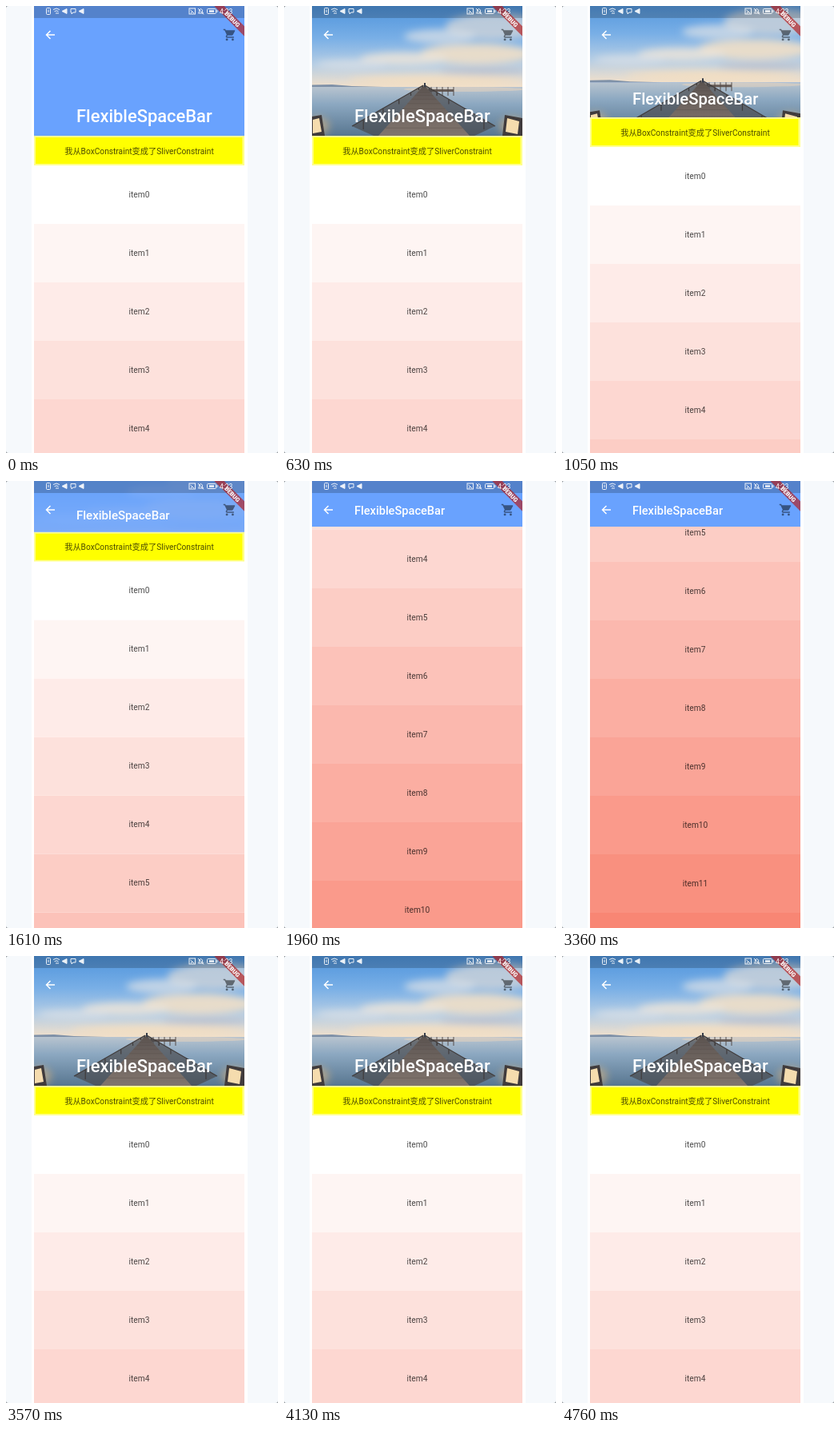
Animation of 340x558 px, one loop 4.83 s. Source, as an HTML page:

```html
<!DOCTYPE html>
<html lang="zh-CN">
<head>
<meta charset="utf-8">
<title>Collapsing app bar</title>
<style>
  html, body { margin: 0; width: 100%; height: 100%; overflow: hidden; background: #8d9196; }
  svg { display: block; width: 100vw; height: 100vh; }
  text { font-family: Roboto, "Noto Sans CJK SC", "Noto Sans CJK", sans-serif; }
  .label { font-size: 10.2px; fill: #000; fill-opacity: .7; text-anchor: middle; }
</style>
</head>
<body>
<svg viewBox="0 0 340 558" preserveAspectRatio="none">
  <defs>
    <clipPath id="screen"><rect x="35" width="263" height="558"/></clipPath>
    <clipPath id="barClip"><rect id="barClipBox" x="35" width="263" height="162"/></clipPath>
    <clipPath id="skyClip"><rect x="35" width="263" height="101"/></clipPath>
    <linearGradient id="sky" x2="0" y2="1">
      <stop offset="0" stop-color="#4f94dc"/>
      <stop offset=".4" stop-color="#79afe6"/>
      <stop offset=".72" stop-color="#b5cde4"/>
      <stop offset="1" stop-color="#f1e0cb"/>
    </linearGradient>
    <linearGradient id="sea" x2="0" y2="1">
      <stop offset="0" stop-color="#b8c4cf"/>
      <stop offset=".35" stop-color="#8ca8c1"/>
      <stop offset="1" stop-color="#587690"/>
    </linearGradient>
    <linearGradient id="deck" x2="0" y2="1">
      <stop offset="0" stop-color="#5d5552"/>
      <stop offset="1" stop-color="#81756e"/>
    </linearGradient>
    <filter id="soft" x="-50%" y="-50%" width="200%" height="200%"><feGaussianBlur stdDeviation="5"/></filter>
  </defs>

  <rect width="340" height="558" rx="3" fill="#f6f9fc"/>
  <rect x="32" width="270" height="558" fill="#fff"/>

  <g clip-path="url(#screen)">
    <g id="list">
      <rect x="35" y="162" width="263" height="37" fill="#ffff8c"/>
      <rect x="37" y="164" width="258.5" height="33" fill="#ff0"/>
      <text class="label" x="166.5" y="184.6">我从BoxConstraint变成了SliverConstraint</text>
    </g>

    <g clip-path="url(#barClip)">
      <rect x="35" width="263" height="162" fill="#69a2fe"/>
      <g id="photo">
        <rect x="35" width="263" height="101" fill="url(#sky)"/>
        <g clip-path="url(#skyClip)">
          <g filter="url(#soft)">
            <ellipse cx="262" cy="26" rx="60" ry="17" fill="#cbd2da" opacity=".85"/>
            <ellipse cx="195" cy="38" rx="45" ry="9" fill="#d9dfe6" opacity=".75"/>
            <ellipse cx="240" cy="60" rx="70" ry="13" fill="#f0dfc8" opacity=".9"/>
            <ellipse cx="150" cy="66" rx="55" ry="8" fill="#ebe4da" opacity=".85"/>
            <ellipse cx="85" cy="73" rx="45" ry="6" fill="#d9dfe7" opacity=".8"/>
            <ellipse cx="250" cy="81" rx="55" ry="5" fill="#b4bdcc" opacity=".75"/>
            <ellipse cx="190" cy="93" rx="110" ry="6" fill="#f6dfc0" opacity=".9"/>
          </g>
        </g>
        <rect x="35" y="101" width="263" height="61" fill="url(#sea)"/>
        <path d="M35 101V98.5L60 98 85 100 125 101Z" fill="#7f91a8"/>
        <ellipse cx="225" cy="104" rx="75" ry="3" fill="#ecd6bd" opacity=".5"/>
        <path d="M180 104H212V107H182Z" fill="#665b56"/>
        <path id="posts" fill="none" stroke="#554d4a" stroke-width="1"/>
        <path d="M174 99 85 150 112 162H238L264 150 176 99Z" fill="#474648" opacity=".65"/>
        <path d="M173 101H177L232 162H118Z" fill="url(#deck)"/>
        <path id="planks" fill="none" stroke="#544c49" stroke-width=".7" opacity=".55"/>
        <path id="rails" fill="none" stroke="#403c3c" stroke-width="1.2"/>
        <rect x="175" y="96" width="2" height="5" fill="#353b47"/>
        <g filter="url(#soft)" fill="#eebc78" opacity=".45">
          <ellipse cx="42" cy="150" rx="15" ry="12"/><ellipse cx="286" cy="150" rx="17" ry="12"/>
        </g>
        <path d="M35 138 47 136 51 162H35ZM298 140 276 136 273 162H298Z" fill="#403b3c"/>
        <path d="M36 142 44 140 47 157 36 159ZM294 144 279 140 277 157 292 160Z" fill="#f5dcae"/>
      </g>
    </g>

    <rect x="35" width="263" height="15" fill="#000" opacity=".2"/>
    <text id="title" font-size="14.6" font-weight="500" fill="#fff">FlexibleSpaceBar</text>
    <path d="M61 36H50.5M55.5 31 50.5 36 55.5 41" fill="none" stroke="#fff" stroke-width="1.5"/>
    <g transform="translate(271 27.3) scale(.73)" fill="#000" opacity=".48">
      <circle cx="7" cy="20" r="2"/><circle cx="17" cy="20" r="2"/>
      <path d="M1 2H4.3L5.2 4H20Q21.3 4 20.8 5.5L17.3 12Q16.7 13 15.5 13H8.1L7.2 14.8 7.4 15H19V17H7Q4.2 16.5 5.2 14L6.6 11.6 3 4H1Z"/>
    </g>

    <g transform="translate(298 0) rotate(45)">
      <rect x="-32" y="17.9" width="64" height="8.8" fill="#b71c1c" opacity=".66"/>
      <text x="1" y="25" font-size="7.4" font-weight="900" fill="#fff" text-anchor="middle">DEBUG</text>
    </g>

    <g fill="none" stroke="#fff" stroke-width="1" opacity=".9">
      <rect x="50.5" y="2.5" width="5" height="8" rx="1"/><path d="M53 4.5V8"/>
      <path d="M59 4.5Q63 1.5 67 4.5M60.5 6.8Q63 4.8 65.5 6.8M62 9H66"/>
      <path d="M70 6.5 76 3.5V9.5ZM91 6.5 97 3.5V9.5Z" fill="#fff"/>
      <path d="M81 3.5H87V8H84L82 10V8H81Z"/>
      <rect x="229" y="3" width="7.5" height="7"/><path d="M230.5 5 235 9M231 9 233 7"/>
      <path d="M240.5 9H246.5L245.5 7.5V5.5Q243.5 1.5 241.5 5.5V7.5ZM240 3 247 10.5"/>
      <rect x="251.5" y="3.5" width="11" height="6" rx="1"/><path d="M254 6.5H260" stroke-width="2.5"/><path d="M264 5V8"/>
    </g>
    <text x="267" y="10" font-size="8.5" fill="#fff">4:23</text>

    <ellipse id="glow" cx="166.5" rx="394" fill="#6aa3ff"/>
  </g>
</svg>

<script>
const LOOP = 4830, STEP = 70, ITEM = 73, ITEMS = 15;
const EXPANDED = 162, TOOLBAR = 57, RANGE = EXPANDED - TOOLBAR;
const PHOTO_READY = 140;

// [time in ms, value]
const SCROLL = [
  [0, 0], [770, 0], [910, 8], [1050, 23], [1330, 55], [1540, 85], [1610, 98.3],
  [1680, 118], [1750, 155], [1890, 330], [2030, 530], [2170, 685], [2240, 727],
  [3080, 727], [3150, 716], [3220, 690], [3290, 630], [3360, 536],
  [3430, 370], [3500, 165], [3570, 0], [LOOP, 0]
];
const GLOW = [[2170, 0], [2240, .35], [2310, .64], [2450, .75], [2520, .7], [2800, 0]];

const el = id => document.getElementById(id);
const clamp = v => Math.min(1, Math.max(0, v));

function add(parent, tag, attrs, text = "") {
  const node = document.createElementNS(parent.namespaceURI, tag);
  for (const key in attrs) node.setAttribute(key, attrs[key]);
  node.textContent = text;
  parent.append(node);
}

function sample(track, t) {
  const i = track.findIndex(p => p[0] > t);
  if (i < 0) return track.at(-1)[1];
  if (i === 0) return track[0][1];
  const [t0, a] = track[i - 1], [t1, b] = track[i];
  return a + (b - a) * (t - t0) / (t1 - t0);
}

function buildList() {
  for (let i = 0; i < ITEMS; i++) {
    const y = EXPANDED + 37 + i * ITEM;
    const fill = `rgb(${255 - .55 * i},${255 - 10.1 * i},${255 - 11.6 * i})`;
    add(el("list"), "rect", { x: 35, y, width: 263, height: ITEM, fill });
    add(el("list"), "text", { class: "label", x: 166.5, y: y + 39.6 }, "item" + i);
  }
}

function buildPier() {
  let planks = "", rails = "M174 99L85 150M176 99L264 150", posts = "";
  for (let i = 1; i < 12; i++) {
    const k = (i / 12) ** 2, y = 101 + 61 * k;
    planks += `M${173 - 55 * k} ${y}H${177 + 55 * k}`;
    if (i % 2) {
      const top = 99 + 51 * k, low = top + 2 + 12 * k;
      rails += `M${174 - 89 * k} ${top}V${low}M${176 + 88 * k} ${top}V${low}`;
    }
  }
  for (let x = 184; x <= 212; x += 7) posts += `M${x} 101V112`;
  el("planks").setAttribute("d", planks);
  el("rails").setAttribute("d", rails);
  el("posts").setAttribute("d", posts);
}

function render(t) {
  const s = sample(SCROLL, t), k = clamp(s / RANGE);
  const bottom = EXPANDED - RANGE * k;
  el("list").setAttribute("transform", `translate(0 ${-s})`);
  el("barClipBox").setAttribute("height", bottom);

  const fadeStart = 1 - 41 / RANGE;
  const opacity = t < PHOTO_READY ? 0 : 1 - clamp((k - fadeStart) / (1 - fadeStart));
  el("photo").setAttribute("opacity", opacity);
  el("photo").setAttribute("transform", `translate(0 ${-RANGE / 4 * k})`);

  const scale = 1.5 - .5 * k;
  el("title").setAttribute("transform", `translate(88 ${bottom - 11.7 - 3.4 * scale}) scale(${scale})`);

  // Edge glow: a wide circle squashed against the bottom edge
  const g = sample(GLOW, t);
  el("glow").setAttribute("cy", 570 + 341.2 * g);
  el("glow").setAttribute("ry", 394 * g);
  el("glow").setAttribute("opacity", Math.min(.25, g * .4));
}

buildList();
buildPier();
const start = performance.now();
function tick() {
  const t = (performance.now() - start) % LOOP;
  render(Math.floor(t / STEP) * STEP);
  requestAnimationFrame(tick);
}
tick();
</script>
</body>
</html>
```
